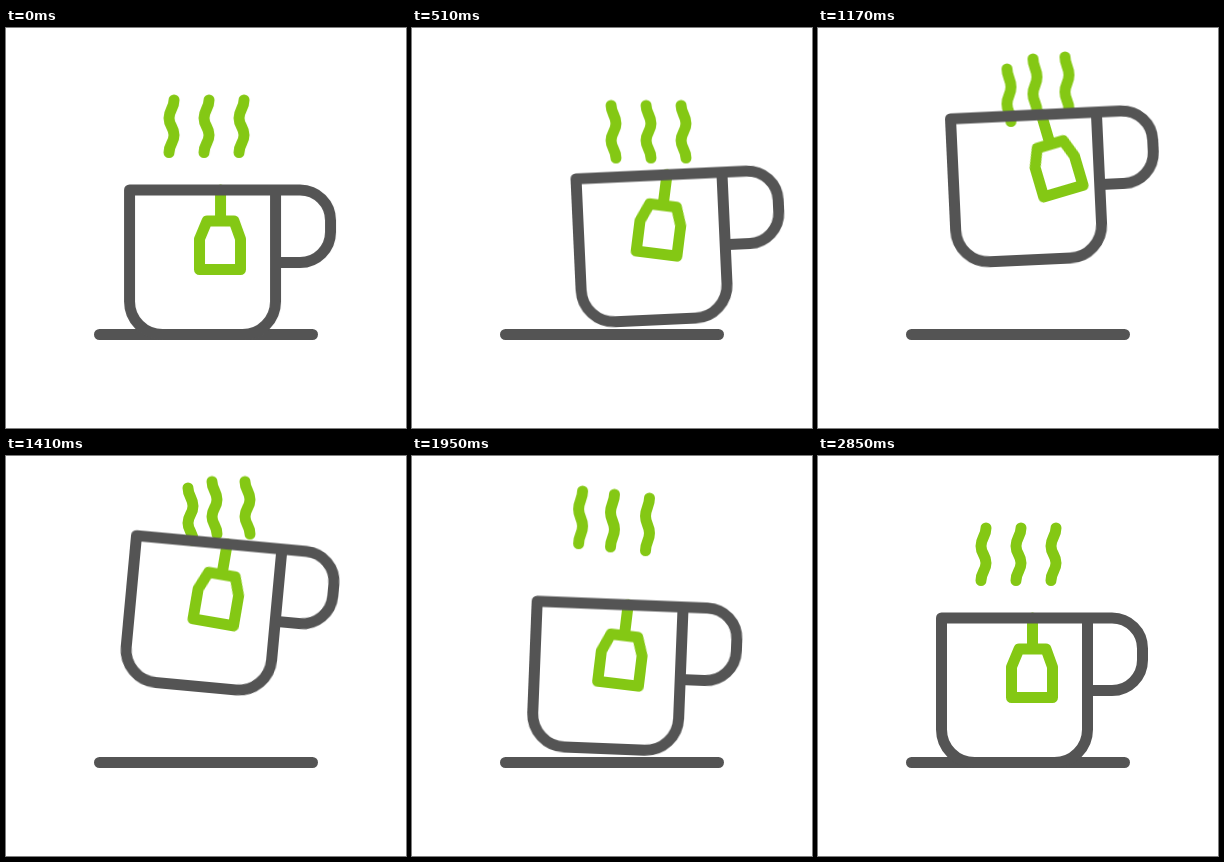
Write an HTML page without scripts that moves like this. It is 400 px wide and 400 px high and loops after 2.91 s.

```html
<!DOCTYPE html>
<html lang="en">
<head>
<meta charset="utf-8">
<title>Tea cup</title>
<style>
html, body { margin: 0; width: 100%; height: 100%; overflow: hidden; background: #fff; }
svg { display: block; width: 100%; height: 100%; }
svg * { animation: 2910ms linear infinite; }
.line { fill: none; stroke: #545454; stroke-width: 11; stroke-linecap: round; stroke-linejoin: round; }
.green { stroke: #84c814; }

.cup { transform-origin: 196px 233px; animation-name: cup; }
.bag { transform-origin: 214.5px 162px; animation-name: swing; }
.steam path { animation-name: wave; animation-timing-function: ease-in-out; }
.s1 { animation-name: s1; }
.s2 { animation-name: s2; }
.s3 { animation-name: s3; }

@keyframes cup {
  0%, 73.2%, 100% { transform: translate(0, 0) rotate(0deg); }
  5.15% { transform: translate(8px, 1.2px) rotate(.5deg); }
  9.28% { transform: translate(24px, .5px) rotate(1deg); }
  13.4% { transform: translate(37px, -4.5px) rotate(0deg); }
  17.53% { transform: translate(43.7px, -14.4px) rotate(-2.6deg); }
  20.62% { transform: translate(44.8px, -23px) rotate(-5deg); }
  24.74% { transform: translate(42px, -35px) rotate(-8.2deg); }
  28.87% { transform: translate(36.5px, -47.5px) rotate(-9.8deg); }
  31.96% { transform: translate(29.8px, -56.2px) rotate(-9.6deg); }
  36.08% { transform: translate(20.5px, -66.5px) rotate(-6.8deg); }
  40.21% { transform: translate(12.3px, -74.5px) rotate(-2.7deg); }
  45.36% { transform: translate(3.5px, -79px) rotate(3deg); }
  50.52% { transform: translate(-2px, -74px) rotate(6.8deg); }
  54.64% { transform: translate(-4.2px, -62px) rotate(8.1deg); }
  56.7% { transform: translate(-4.5px, -55.4px) rotate(8.1deg); }
  61.86% { transform: translate(-3px, -36px) rotate(6deg); }
  67.01% { transform: translate(-1.2px, -14px) rotate(2.3deg); }
  71.13% { transform: translate(-.2px, -2px) rotate(.4deg); }
}

/* bag angle relative to the cup */
@keyframes swing {
  0%, 97.94%, 100% { transform: rotate(0deg); }
  5.15% { transform: rotate(4.5deg); }
  9.28% { transform: rotate(9deg); }
  13.4% { transform: rotate(10.5deg); }
  17.53% { transform: rotate(9.8deg); }
  20.62% { transform: rotate(6deg); }
  24.74% { transform: rotate(-1.8deg); }
  28.87% { transform: rotate(-9.7deg); }
  31.96% { transform: rotate(-13.2deg); }
  36.08% { transform: rotate(-15.5deg); }
  40.21% { transform: rotate(-13.8deg); }
  45.36% { transform: rotate(-3deg); }
  50.52% { transform: rotate(9.2deg); }
  54.64% { transform: rotate(16.8deg); }
  56.7% { transform: rotate(18.3deg); }
  61.86% { transform: rotate(14deg); }
  67.01% { transform: rotate(4.7deg); }
  71.13% { transform: rotate(-3.9deg); }
  73.2% { transform: rotate(-7deg); }
  76.29% { transform: rotate(-9.5deg); }
  81.44% { transform: rotate(-6.2deg); }
  86.6% { transform: rotate(-.5deg); }
  90.03% { transform: rotate(1.8deg); }
  92.78% { transform: rotate(1.6deg); }
}

@keyframes wave {
  0%, 29.9%, 70.1%, 100% { d: path("M2.5 0C2.5 8 -2.5 10 -2.5 18C-2.5 26 2.5 27 2.5 35C2.5 43 -2.5 44 -2.5 52.5"); }
  16.5%, 43.3%, 56.7% { d: path("M-2.5 0C-2.5 8 2.5 10 2.5 18C2.5 26 -2.5 27 -2.5 35C-2.5 43 2.5 44 2.5 52.5"); }
}

@keyframes s1 {
  0%, 92.78%, 100% { transform: translate(0, 0); }
  5.15% { transform: translate(4px, .5px); }
  9.28% { transform: translate(15px, 2px); }
  13.4% { transform: translate(28px, 4px); }
  17.53% { transform: translate(36px, 5.5px); }
  21.65% { transform: translate(38.5px, 2.5px); }
  26.8% { transform: translate(37.5px, -7px); }
  31.96% { transform: translate(33.5px, -17px); }
  40.21% { transform: translate(25.5px, -31px); }
  48.45% { transform: translate(19px, -40px); }
  56.7% { transform: translate(12px, -44px); }
  64.95% { transform: translate(4px, -40px); }
  74.23% { transform: translate(0, -26px); }
  81.44% { transform: translate(0, -12px); }
  87.63% { transform: translate(0, -3px); }
}

@keyframes s2 {
  0%, 92.78%, 100% { transform: translate(0, 0); }
  5.15% { transform: translate(5px, .7px); }
  9.28% { transform: translate(17px, 2.5px); }
  13.4% { transform: translate(29px, 4.8px); }
  17.53% { transform: translate(36px, 5.5px); }
  21.65% { transform: translate(37px, -1px); }
  26.8% { transform: translate(32.5px, -15px); }
  31.96% { transform: translate(26.5px, -28px); }
  40.21% { transform: translate(16.5px, -41px); }
  48.45% { transform: translate(8px, -46.5px); }
  56.7% { transform: translate(2px, -45px); }
  64.95% { transform: translate(0, -37px); }
  74.23% { transform: translate(0, -22px); }
  81.44% { transform: translate(0, -8px); }
  87.63% { transform: translate(0, -1.5px); }
}

@keyframes s3 {
  0%, 92.78%, 100% { transform: translate(0, 0); }
  5.15% { transform: translate(6px, 1px); }
  9.28% { transform: translate(18px, 3px); }
  13.4% { transform: translate(30px, 5px); }
  17.53% { transform: translate(36px, 5.5px); }
  21.65% { transform: translate(36.5px, -2px); }
  26.8% { transform: translate(31px, -18px); }
  31.96% { transform: translate(24.5px, -31px); }
  40.21% { transform: translate(13.5px, -43px); }
  48.45% { transform: translate(6px, -46.5px); }
  56.7% { transform: translate(1px, -41px); }
  64.95% { transform: translate(0, -33px); }
  74.23% { transform: translate(0, -19px); }
  81.44% { transform: translate(0, -6px); }
  87.63% { transform: translate(0, -1px); }
}
</style>
</head>
<body>
<svg viewBox="0 0 400 400">
  <g class="line green steam">
    <g class="s1"><g transform="translate(165.5 72)"><path d="M2.5 0C2.5 8 -2.5 10 -2.5 18C-2.5 26 2.5 27 2.5 35C2.5 43 -2.5 44 -2.5 52.5"/></g></g>
    <g class="s2"><g transform="translate(200.5 72)"><path d="M2.5 0C2.5 8 -2.5 10 -2.5 18C-2.5 26 2.5 27 2.5 35C2.5 43 -2.5 44 -2.5 52.5"/></g></g>
    <g class="s3"><g transform="translate(235.5 72)"><path d="M2.5 0C2.5 8 -2.5 10 -2.5 18C-2.5 26 2.5 27 2.5 35C2.5 43 -2.5 44 -2.5 52.5"/></g></g>
  </g>
  <path class="line" d="M93.5 306.5H306.5"/>
  <g class="cup">
    <path class="line green bag" d="M214.5 162V193M201 193H228L234.5 211V241.5H193.5V211Z"/>
    <path class="line" d="M269.5 162V273.5a33 33 0 0 1 -33 33h-80a33 33 0 0 1 -33 -33V162H294a30.5 30.5 0 0 1 30.5 30.5V204a30.5 30.5 0 0 1 -30.5 30.5H269.5"/>
  </g>
</svg>
</body>
</html>
```
